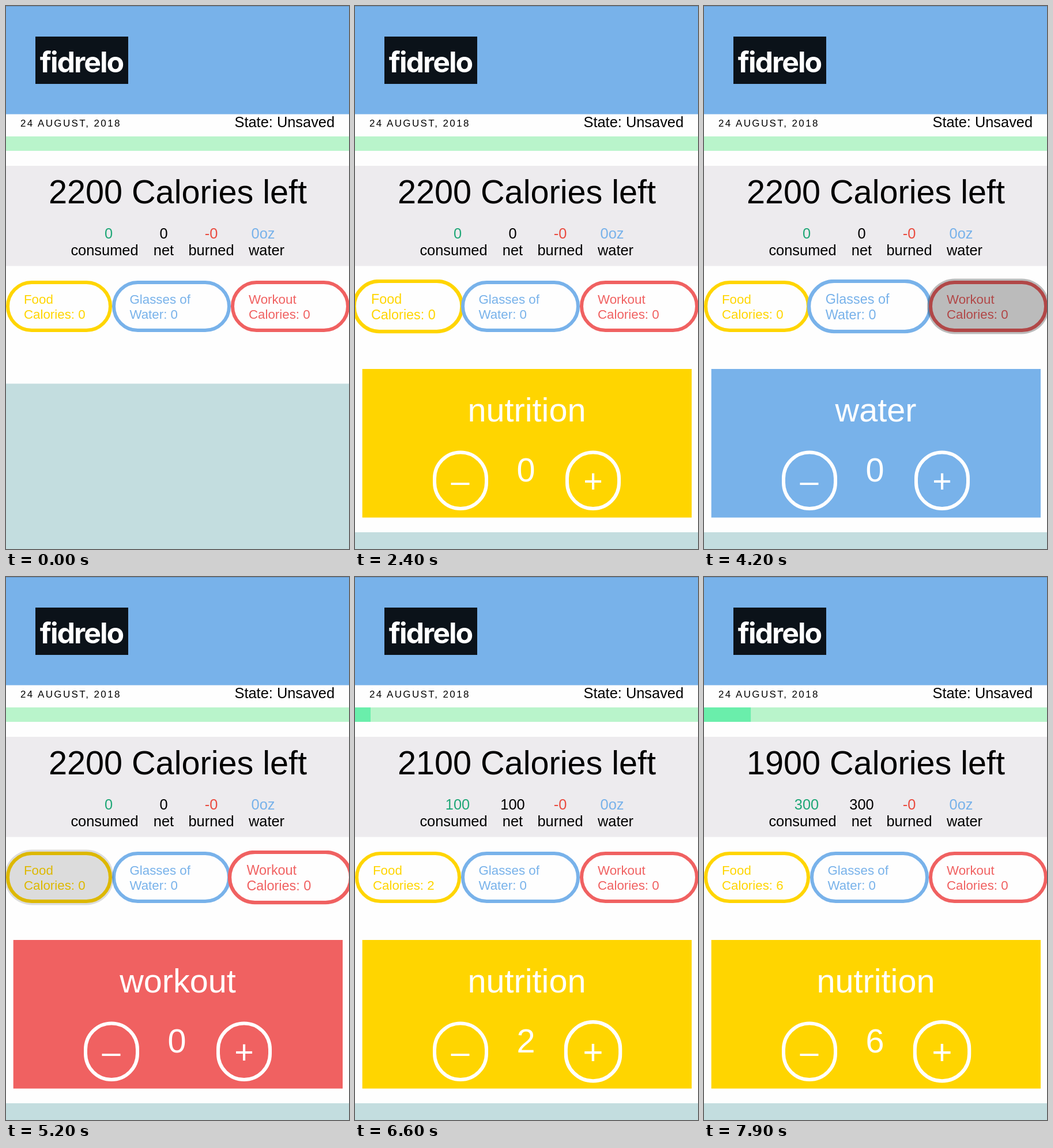
Animation of 595 by 941 pixels, one loop 8 s. Source, as an HTML page:

```html
<!DOCTYPE html>
<html lang="en">
<head>
<meta charset="utf-8">
<title>Calorie counter</title>
<style>
  :root { --blue: #78b2ea; --yellow: #ffd500; --red: #f06161; --loop: 8s; }
  html, body { margin: 0; width: 100%; height: 100%; overflow: hidden; background: #fefefe; }
  svg { display: block; width: 100vw; height: 100vh; }
  text { font-family: "Liberation Sans", Arial, sans-serif; font-size: 25.4px; white-space: pre; }
  .mid, .stats text { text-anchor: middle; }
  .big { font-size: 57.6px; }
  .date { font-size: 17px; letter-spacing: 2.4px; }
  .brand { font: 700 50px Inter, sans-serif; letter-spacing: -2px; fill: #fff; }

  .pill rect, .round rect { fill: #fefefe; stroke: currentColor; stroke-width: 6px; }
  .pill text { font-size: 22.3px; fill: currentColor; }
  .round rect { fill: none; }
  .pill, .round { transform-box: fill-box; transform-origin: center; }
  #food { color: var(--yellow); animation: food var(--loop) infinite; }
  #water { color: var(--blue); animation: water var(--loop) infinite; }
  #workout { color: var(--red); animation: workout var(--loop) infinite; }
  .round { color: #fff; fill: #fff; }
  #plus { animation: plus var(--loop) infinite; }

  /* Touch highlight: rises, holds, fades within 400 ms of its delay */
  .tap { opacity: 0; animation: tap var(--loop) linear infinite; }
  @keyframes tap {
    0%, 5%, 100% { opacity: 0; }
    1.25%, 2.5% { opacity: .26; }
  }

  /* The last touched button stays 5% larger */
  @keyframes food {
    0%, 18.125%, 40%, 68.125%, 80.625%, 100% { transform: scale(1); }
    21.875%, 36.25%, 71.875%, 76.875% { transform: scale(1.05); }
  }
  @keyframes water {
    0%, 36.25%, 58.75%, 100% { transform: scale(1); }
    40%, 55% { transform: scale(1.05); }
  }
  @keyframes workout {
    0%, 55%, 71.875%, 100% { transform: scale(1); }
    58.75%, 68.125% { transform: scale(1.05); }
  }
  @keyframes plus {
    0%, 76.875% { transform: scale(1); }
    80.625%, 100% { transform: scale(1.05); }
  }

  #panel { animation: open var(--loop) step-end infinite; }
  #card { animation: tint var(--loop) step-end infinite; }
  @keyframes open {
    0% { visibility: hidden; }
    16.875%, 100% { visibility: visible; }
  }
  @keyframes tint {
    0%, 66.875%, 100% { fill: var(--yellow); }
    35% { fill: var(--blue); }
    53.75% { fill: var(--red); }
  }
</style>
</head>
<body>
<svg viewBox="0 0 595 941">
  <rect width="595" height="941" fill="#fefefe"/>
  <rect width="595" height="187.5" fill="#78b2ea"/>
  <rect width="595" height="1" fill="#6596c6"/>
  <rect x="51" y="53" width="161" height="82" fill="#0b1219"/>
  <text class="brand mid" x="131" y="115">fidrelo</text>

  <text class="date" x="25" y="208.5">24 AUGUST, 2018</text>
  <text x="396.5" y="210">State: Unsaved</text>
  <rect y="226" width="595" height="25" fill="#b9f4cb"/>
  <rect id="bar" y="226" width="0" height="25" fill="#6aeeab"/>

  <rect y="277" width="595" height="173.5" fill="#edebee"/>
  <text class="big mid" x="298" y="342"><tspan id="left">2200</tspan> Calories left</text>
  <g class="stats">
    <text id="consumed" x="178" y="403" fill="#1fa777">0</text>
    <text id="net" x="273.5" y="403">0</text>
    <text x="356" y="403" fill="#ea4c40">-0</text>
    <text x="446" y="403" fill="#78b2ea">0oz</text>
    <text x="171" y="432">consumed</text>
    <text x="273.5" y="432">net</text>
    <text x="356" y="432">burned</text>
    <text x="452" y="432">water</text>
  </g>

  <rect y="654.5" width="595" height="286.5" fill="#c3dddf"/>

  <g id="food" class="pill">
    <rect x="3" y="479" width="178" height="83" rx="41.5"/>
    <text x="31" y="516">Food</text>
    <text x="31" y="542">Calories: <tspan id="meals">0</tspan></text>
  </g>
  <g id="water" class="pill">
    <rect x="187" y="479" width="200" height="83" rx="41.5"/>
    <text x="214.5" y="516">Glasses of</text>
    <text x="214.5" y="542">Water: 0</text>
  </g>
  <g id="workout" class="pill">
    <rect x="393" y="479" width="200" height="83" rx="41.5"/>
    <text x="421" y="516">Workout</text>
    <text x="421" y="542">Calories: 0</text>
  </g>

  <rect class="tap" style="animation-delay:1.15s" x="-3" y="472.5" width="190" height="96" rx="48"/>
  <rect class="tap" style="animation-delay:2.6s" x="181" y="472.5" width="212" height="96" rx="48"/>
  <rect class="tap" style="animation-delay:4.1s" x="387" y="472.5" width="212" height="96" rx="48"/>
  <rect class="tap" style="animation-delay:5.15s" x="-3" y="472.5" width="190" height="96" rx="48"/>

  <g id="panel">
    <rect y="654" width="595" height="258" fill="#fefefe"/>
    <rect id="card" x="12.7" y="629" width="571.3" height="257.5"/>
    <text id="label" class="big mid" x="298" y="720" fill="#fff">nutrition</text>
    <text id="count" class="big mid" x="296.5" y="824" fill="#fff">0</text>
    <g class="round">
      <rect x="138" y="773.5" width="90" height="97.5" rx="45"/>
      <text class="big mid" x="182.5" y="843">–</text>
    </g>
    <g id="plus" class="round">
      <rect x="368" y="773.5" width="90" height="97.5" rx="45"/>
      <text class="big mid" x="413" y="843">+</text>
    </g>
  </g>
</svg>
<script>
  const LOOP = 8000, GOAL = 2200, STEP = 50;
  const FIRST_TAP = 6145, TAP_GAP = 330, TOTAL_LAG = 90;
  const byId = id => document.getElementById(id);

  const setText = (id, value) => {
    const el = byId(id);
    if (el.textContent !== String(value)) el.textContent = value;
  };

  const taps = t => Math.max(0, Math.floor((t - FIRST_TAP) / TAP_GAP) + 1);

  const panelName = t =>
    t >= 2800 && t < 4300 ? 'water' :
    t >= 4300 && t < 5350 ? 'workout' : 'nutrition';

  function draw(t) {
    const count = taps(t);
    const eaten = taps(t - TOTAL_LAG) * STEP;
    setText('label', panelName(t));
    setText('count', count);
    setText('meals', count);
    setText('left', GOAL - eaten);
    setText('consumed', eaten);
    setText('net', eaten);
    byId('bar').setAttribute('width', 595 * eaten / GOAL);
  }

  // The first frame's time is also when the CSS animations begin.
  let start;
  function tick(now) {
    start ??= now;
    draw((now - start) % LOOP);
    requestAnimationFrame(tick);
  }
  requestAnimationFrame(tick);
</script>
</body>
</html>
```
